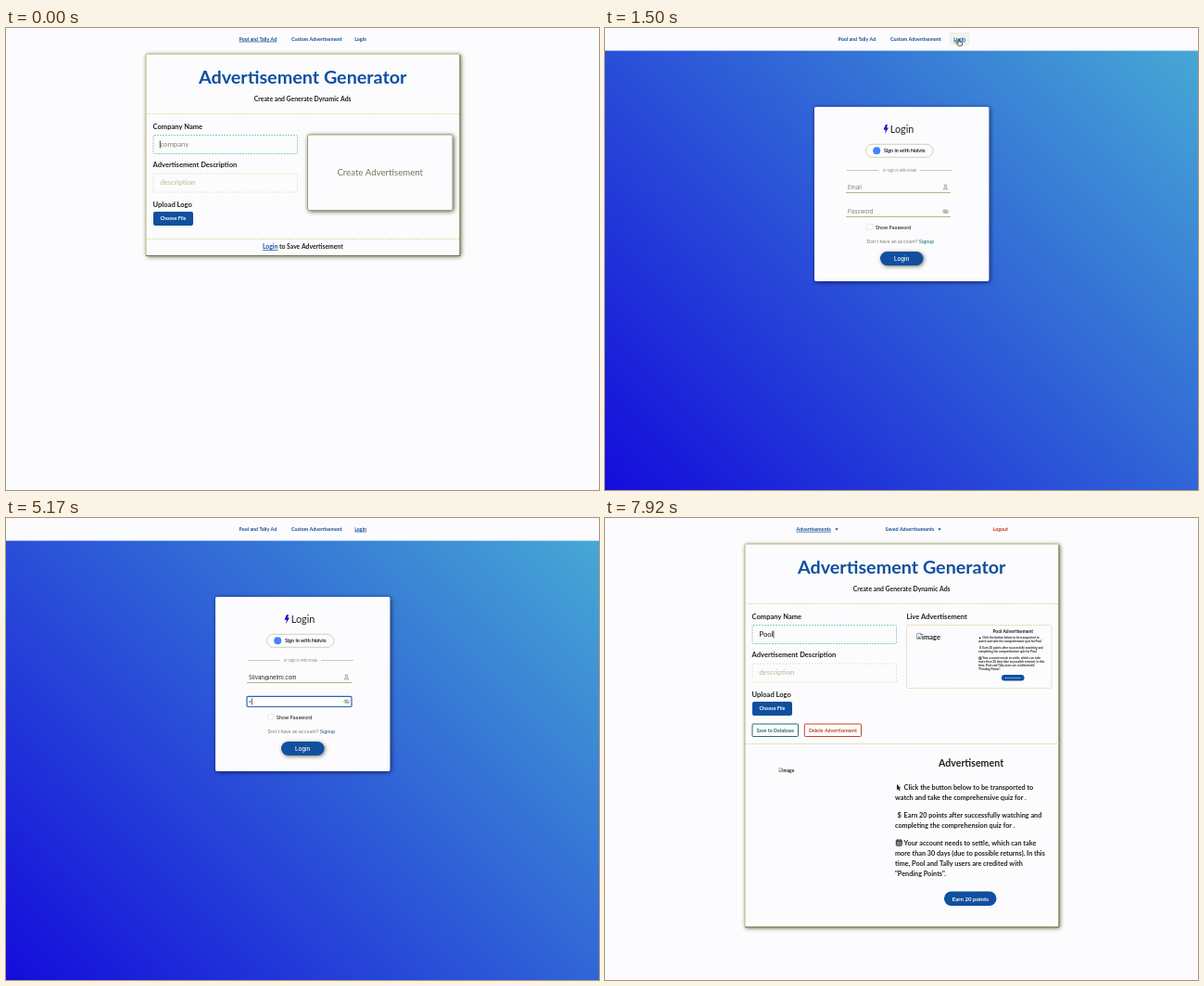
An HTML page with a canvas that plays this animation: 640 by 498 pixels, repeating every 8 s.

```html
<!DOCTYPE html>
<html lang="en">
<head>
<meta charset="utf-8">
<title>Advertisement Generator</title>
<style>
  html, body { margin: 0; width: 640px; height: 498px; overflow: hidden; background: #fcfcfe; }
  canvas { display: block; width: 640px; height: 498px; }
</style>
</head>
<body>
<canvas id="stage"></canvas>
<script>
const LOOP = 8000;
const BG = '#fcfcfe', BLUE = '#10509f', INK = '#212121', NAVY = '#174f90';
const OLIVE = '#85846c', YELLOW = '#dfdca4', MINT = '#93cdbd', RULE = '#b6b582';
const EMAIL = 'Silvan@nelmi.com', COMPANY = 'Pool', BRAND = 'Pool and Tally';
const canvas = document.getElementById('stage');
const ctx = canvas.getContext('2d');
const dpr = window.devicePixelRatio || 1;
canvas.width = 640 * dpr;
canvas.height = 498 * dpr;

// Moments at which each character appears
const emailKeys = [2420, 2580, 2750, 2920, 3080, 3330, 3500, 3580, 3750, 3830, 3920, 4040, 4170, 4330, 4420, 4580];
const passKeys = [5080, 5250, 5420, 5580, 5750, 5830, 6000, 6080, 6170, 6250];
const nameKeys = [7250, 7500, 7670, 7830];
const count = (keys, t) => keys.filter(k => k <= t).length;

function txt(s, x, y, size, color = INK, weight = 700, font = 'Lato', align = 'left') {
  ctx.font = `${weight} ${size}px ${font}, sans-serif`;
  ctx.textAlign = align;
  ctx.fillStyle = color;
  ctx.fillText(s, x, y);
  return ctx.measureText(s).width;
}
const mid = (s, x, y, size, color, weight, font) => txt(s, x, y, size, color, weight, font, 'center');
const inter = (s, x, y, size, color, weight = 400) => txt(s, x, y, size, color, weight, 'Inter');

function line(x1, y1, x2, y2, color, width = 1, dash = []) {
  ctx.strokeStyle = color;
  ctx.lineWidth = width;
  ctx.setLineDash(dash);
  ctx.beginPath();
  ctx.moveTo(x1, y1);
  ctx.lineTo(x2, y2);
  ctx.stroke();
  ctx.setLineDash([]);
}

function box(x, y, w, h, r, fill, stroke, dash = [], width = 1) {
  ctx.beginPath();
  ctx.roundRect(x, y, w, h, r);
  if (fill) { ctx.fillStyle = fill; ctx.fill(); }
  if (stroke) {
    ctx.strokeStyle = stroke;
    ctx.lineWidth = width;
    ctx.setLineDash(dash);
    ctx.stroke();
    ctx.setLineDash([]);
  }
}

function raised(x, y, w, h, r, fill, shade, blur, stroke) {
  ctx.save();
  ctx.shadowColor = shade;
  ctx.shadowBlur = blur * dpr;
  ctx.shadowOffsetX = ctx.shadowOffsetY = dpr;
  box(x, y, w, h, r, fill);
  ctx.restore();
  if (stroke) box(x, y, w, h, r, null, stroke);
}

function poly(points, fill, stroke, width = 0.8) {
  ctx.beginPath();
  points.forEach(([x, y]) => ctx.lineTo(x, y));
  ctx.closePath();
  if (fill) { ctx.fillStyle = fill; ctx.fill(); }
  if (stroke) { ctx.strokeStyle = stroke; ctx.lineWidth = width; ctx.stroke(); }
}

function at(x, y, scale, draw) {
  ctx.save();
  ctx.translate(x, y);
  ctx.scale(scale, scale);
  draw();
  ctx.restore();
}

function card(h, x = 151, w = 339) {
  raised(x, 28, w, h, 1.5, BG, 'rgba(78,76,30,.85)', 5, '#bcba88');
  line(x + w, 29, x + w, 28 + h, '#706f50');
  line(x, 28 + h, x + w, 28 + h, '#706f50');
}

const ARROW = [[0, 0], [0, 7], [1.6, 5.6], [2.7, 8], [3.9, 7.5], [2.8, 5.1], [5, 5]];
const arrow = (x, y, scale, fill, stroke) => at(x, y, scale, () => poly(ARROW, fill, stroke));

function hand(x, y) {
  at(x, y, 1, () => poly([[-0.8, 0], [0.5, 0], [0.6, 2.4], [3, 2.8], [3.6, 3.6], [3.2, 6.6],
    [-0.8, 6.6], [-3, 3.8], [-2.4, 3.2], [-0.8, 4.2]], '#fff', '#333'));
}

function ibeam(x, y) {
  line(x, y - 4, x, y + 4, '#222', 0.8);
  line(x - 1.5, y - 4, x + 1.5, y - 4, '#222', 0.8);
  line(x - 1.5, y + 4, x + 1.5, y + 4, '#222', 0.8);
}

function underlined(s, x, y, size, color, font) {
  const w = txt(s, x, y, size, color, font === 'Inter' ? 600 : 700, font);
  line(x, y + 1.1, x + w, y + 1.1, color, 0.7);
  return w;
}

function guestNav(active, hover) {
  if (hover) box(372.5, 5.5, 20, 12.5, 1, '#f3f3f0', '#e6e4cc', [1, 1]);
  [[BRAND + ' Ad', 251.5], ['Custom Advertisement', 308], ['Login', 376.2]].forEach(([s, x], i) => {
    if (i === active) underlined(s, x, 13.8, 5.33, NAVY);
    else txt(s, x, 13.8, 5.33, NAVY);
  });
}

function memberNav() {
  underlined('Advertisements', 206.5, 14, 5.33, NAVY);
  txt('Saved Advertisements', 302.5, 14, 5.33, NAVY);
  txt('Logout', 418.5, 14, 5.33, '#c03a1d');
  for (const x of [250, 361]) poly([[x - 1.8, 11.3], [x + 1.8, 11.3], [x, 13.5]], NAVY);
}

function caret(x, y, h = 8) { line(x, y - h / 2, x, y + h / 2, '#222', 0.8); }

function generatorForm(typed, blink) {
  mid('Advertisement Generator', 320.2, 60.2, 19.75, BLUE);
  mid('Create and Generate Dynamic Ads', 320.2, 78.5, 6.85);
  line(151, 92.5, 490, 92.5, YELLOW, 1, [2, 1]);
  txt('Company Name', 158.6, 108.8, 7.56);
  box(159, 115.5, 155.5, 20, 1, null, MINT, [2, 1]);
  if (typed) txt(typed, 166.4, 128.2, 7.75, INK, 500);
  else txt('company', 166.4, 128.2, 7.75, OLIVE, 400);
  const typedWidth = typed ? ctx.measureText(typed).width + 0.5 : 0;
  if (blink) caret(166.3 + typedWidth, 125.5);
  txt('Advertisement Description', 158.6, 150, 7.56);
  box(159, 157, 155.5, 20, 1, null, '#e8e5b4', [2, 1.5]);
  txt('description', 166.4, 169.3, 7.75, '#bab894', 400);
  txt('Upload Logo', 158.6, 193.2, 7.56);
  box(159, 198, 43, 15, 2, BLUE);
  txt('Choose File', 166.5, 207.4, 5.4, '#fff');
}

function createPanel() {
  raised(325.5, 115, 156.5, 81.5, 1.5, BG, 'rgba(50,48,20,.9)', 5, '#a09e78');
  mid('Create Advertisement', 403.7, 159, 9.65, '#77755a', 400);
}

function homePage(t) {
  guestNav(0);
  card(217.5);
  generatorForm('', t < 500);
  createPanel();
  line(151, 227.5, 490, 227.5, YELLOW, 1, [2, 1]);
  const w = underlined('Login', 277, 238.4, 6.8, BLUE);
  txt(' to Save Advertisement', 277 + w, 238.4, 6.8);
}

function customPage(t) {
  guestNav(1, t >= 1250);
  card(203, 189, 263);
  mid('Custom Advertisement', 320.4, 54.3, 14.9, BLUE, 600, 'Inter');
  mid('Create a Custom Advertisement', 320.3, 69.6, 6.75);
  line(189, 79.5, 452, 79.5, YELLOW, 1, [3, 2]);
  line(189, 131.5, 452, 131.5, '#cfcfca', 1, [1, 1]);
  line(189, 157.5, 452, 157.5, '#cfcfca', 1, [1, 1]);
  ['Title', 'Description', 'Border', 'Global', 'Image'].forEach((s, i) => {
    const y = 93.7 + i * 25.6;
    mid('Edit ' + s, 320.4, y + 2.4, 6.5, NAVY, 500, 'Inter');
    line(207.3, y - 0.8, 209.8, y + 1.4, NAVY, 1.3);
    line(209.2, y + 1.4, 211.8, y - 0.8, NAVY, 1.3);
  });
  line(189, 208.5, 452, 208.5, YELLOW, 1, [3, 2]);
  const w = underlined('Login', 262, 221.4, 6.4, BLUE, 'Inter');
  inter(' to Save Custom Advertisement', 262 + w, 221.4, 6.4, INK, 600);
}

function backdrop() {
  const g = ctx.createLinearGradient(42, 540, 598, -17);
  g.addColorStop(0, '#140cdb');
  g.addColorStop(1, '#46a8d4');
  ctx.fillStyle = g;
  ctx.fillRect(0, 24.5, 640, 473.5);
}

function field(label, value, y, focused) {
  if (focused) box(260, y - 5.5, 113, 11.2, 1.2, '#fff', '#2664ac', [], 1.2);
  else line(260, y + 5.7, 373, y + 5.7, RULE);
  if (value !== null) inter(value, 262, y + 2.2, 5.95, INK);
  else inter(label, 262, y + 2.2, 5.95, '#7c7c70');
  return 262.5 + (value ? ctx.measureText(value).width : 0);
}

function loginPage(t) {
  guestNav(2, t < 1750);
  backdrop();
  raised(226, 85, 188.5, 188, 2, BG, 'rgba(0,0,30,.7)', 5);

  poly([[302.8, 104.3], [305, 104.3], [304, 107.6], [306, 107.6], [302.1, 114], [302.8, 109.8], [300.5, 109.8]], '#1c14c4');
  txt('Login', 307.8, 113, 10.8, INK, 400);
  box(281.5, 125.3, 72.5, 14, 7, BG, '#cfd2b8');
  ctx.fillStyle = '#4285f4';
  ctx.beginPath();
  ctx.arc(293.2, 132.3, 4, 0, 7);
  ctx.fill();
  txt('Sign in with Nolvio', 301, 134.2, 5.33);
  line(261, 153.5, 295.5, 153.5, '#b9bbb6', 0.8);
  line(340, 153.5, 375, 153.5, '#b9bbb6', 0.8);
  mid('or Sign in with Email', 317.8, 154.8, 3.8, '#85846c', 400, 'Inter');

  const mail = count(emailKeys, t), dots = count(passKeys, t);
  const onMail = t >= 2250 && t < 4830, onPass = t >= 4830;
  const endX = field('Email', mail ? EMAIL.slice(0, mail) : null, 171.8, onMail);
  if (onMail) caret(endX, 171.8, 7);
  field('Password', dots ? '' : null, 197.8, onPass);
  ctx.fillStyle = INK;
  for (let i = 0; i < dots; i++) {
    ctx.beginPath();
    ctx.arc(263.2 + i * 3.03, 198, 0.8, 0, 7);
    ctx.fill();
  }
  if (onPass && t < 6330) caret(262.3 + dots * 3.03, 197.8, 7);

  // Person and eye marks
  ctx.strokeStyle = '#85847a';
  ctx.lineWidth = 0.7;
  ctx.beginPath();
  ctx.arc(367.5, 170, 1.3, 0, 7);
  ctx.moveTo(365.2, 173.8);
  ctx.quadraticCurveTo(367.5, 169.6, 369.8, 173.8);
  ctx.closePath();
  ctx.stroke();
  ctx.beginPath();
  ctx.ellipse(367.5, 197.8, 2.9, 1.7, 0, 0, 7);
  ctx.moveTo(368.4, 197.8);
  ctx.arc(367.5, 197.8, 0.8, 0, 7);
  ctx.stroke();
  line(365, 196, 370, 199.8, '#85847a', 0.6);

  box(282.8, 211.3, 6, 6, 1, '#fff', '#e4e2cc', [], 0.8);
  inter('Show Password', 291.8, 216.5, 5.05, INK, 500);
  const w = inter("Don't have an account? ", 282.5, 231.7, 4.95, '#747466');
  inter('Signup', 282.5 + w, 231.7, 4.95, '#2b7080', 500);
  raised(297, 241, 46.5, 15, 7.5, BLUE, 'rgba(60,60,40,.7)', 4);
  mid('Login', 320.2, 251, 6.15, '#fff', 500, 'Inter');
}

function calendar(x, y, s) {
  at(x, y, s, () => {
    box(0, -5.4, 6, 6, 0.5, null, INK, [], 0.9);
    for (const d of [-3.9, -2.3, -0.8]) line(0, d, 6, d, INK, d < -3 ? 1 : 0.5);
    for (const d of [1.5, 3, 4.5]) line(d, -3.9, d, 0.6, INK, 0.5);
    line(1.5, -6.4, 1.5, -4.8, INK, 0.9);
    line(4.5, -6.4, 4.5, -4.8, INK, 0.9);
  });
}

function steps(x, y, size, pitch, gap, name) {
  const s = size / 7.25, tab = 9.6 * s;
  const blocks = [
    ['Click the button below to be transported to', `watch and take the comprehensive quiz for ${name}.`],
    ['Earn 20 points after successfully watching and', `completing the comprehension quiz for ${name}.`],
    ['Your account needs to settle, which can take', 'more than 30 days (due to possible returns). In this',
      `time, ${BRAND} users are credited with`, '"Pending Points".']
  ];
  blocks.forEach((lines, b) => {
    if (b === 0) arrow(x + 2 * s, y - 6 * s, 0.9 * s, INK);
    if (b === 1) txt('$', x + 2.5 * s, y, size * 1.05);
    if (b === 2) calendar(x + 1.3 * s, y, s);
    lines.forEach((l, i) => txt(l, x + (i ? 0 : tab), y + i * pitch, size));
    y += lines.length * pitch + gap;
  });
}

function missingImage(x, y, size) {
  at(x, y, size / 7.5, () => {
    box(0, -5.6, 5, 6, 0.4, '#e9eef0', '#8a8f8a', [], 0.7);
    poly([[0.6, 0], [2.4, -2.6], [4.4, 0]], '#4f9a55');
    poly([[3.2, -5.8], [5.2, -5.8], [5.2, -3.6]], '#5b8fc4');
  });
  txt('image', x + 5.8 * size / 7.5, y + size * 0.1, size);
}

function livePanel(name) {
  txt('Live Advertisement', 325.5, 108.8, 7.56);
  box(325.5, 115.5, 156.5, 68, 1.5, null, '#dcd9ac', [2, 1]);
  missingImage(336.3, 130, 7.5);
  mid(name + ' Advertisement', 440.2, 124, 4.95);
  steps(403, 130.3, 3.2, 3.75, 3.5, name);
  box(428, 169, 24.5, 6.5, 3.2, BLUE);
  mid('Earn 20 points', 440.2, 173, 2.6, '#fff');
}

function outlineButton(s, x, w, color) {
  box(x, 222, w, 13.5, 1, null, color);
  mid(s, x + w / 2, 230.6, 5.3, color);
}

function memberPage(t) {
  const name = COMPANY.slice(0, count(nameKeys, t));
  memberNav();
  card(413);
  generatorForm(name, true);
  if (name) livePanel(name);
  else createPanel();
  outlineButton('Save to Database', 159, 49.5, name ? '#2a6f60' : '#8aae88');
  outlineButton('Delete Advertisement', 215.3, 61.2, name ? '#c8421f' : '#eb9f60');
  line(151, 243.5, 490, 243.5, '#c9c690', 1, [1, 1]);
  if (name) missingImage(187.5, 273.4, 4.9);
  mid('Advertisement', 395, 267.6, 10.66);
  steps(313, 293, 7.25, 11.1, 7.6, '');
  box(366, 402.5, 56.5, 15.5, 7.7, BLUE);
  mid('Earn 20 points', 394.3, 412.6, 6.1, '#fff');
  if (t < 6700) {
    box(-2, 493.5, 215, 10, 1, '#dedec8', '#c5c4a0', [], 0.6);
    txt('Waiting for the account page to load...', 1, 499.5, 5.3, '#444', 400);
  }
}

function glide(t, t0, t1, from, to) {
  const p = Math.min(1, Math.max(0, (t - t0) / (t1 - t0)));
  const e = p * p * (3 - 2 * p);
  return from.map((v, i) => v + (to[i] - v) * e);
}

function pointer(t) {
  if (t < 80 || t >= 2420) return;
  if (t < 900) {
    const [x, y] = glide(t, 80, 500, [105, 60], [336, 12]);
    if (t < 440) arrow(x, y, 0.9, '#222', '#fff');
    else hand(x, y);
  } else if (t < 1670) {
    const [x, y] = glide(t, 900, 1280, [336, 12], [382, 12.5]);
    hand(x, y);
  } else {
    const [x, y] = glide(t, 1670, 2170, [382, 12.5], [300, 172]);
    if (t < 2130) arrow(x, y, 0.9, '#222', '#fff');
    else ibeam(x, y);
  }
}

function draw(t) {
  ctx.setTransform(dpr, 0, 0, dpr, 0, 0);
  ctx.fillStyle = BG;
  ctx.fillRect(0, 0, 640, 498);
  if (t < 600) homePage(t);
  else if (t < 1500) customPage(t);
  else if (t < 6500) loginPage(t);
  else memberPage(t);
  pointer(t);
}

const start = performance.now();
function tick() {
  draw((performance.now() - start) % LOOP);
  requestAnimationFrame(tick);
}
tick();
</script>
</body>
</html>
```
